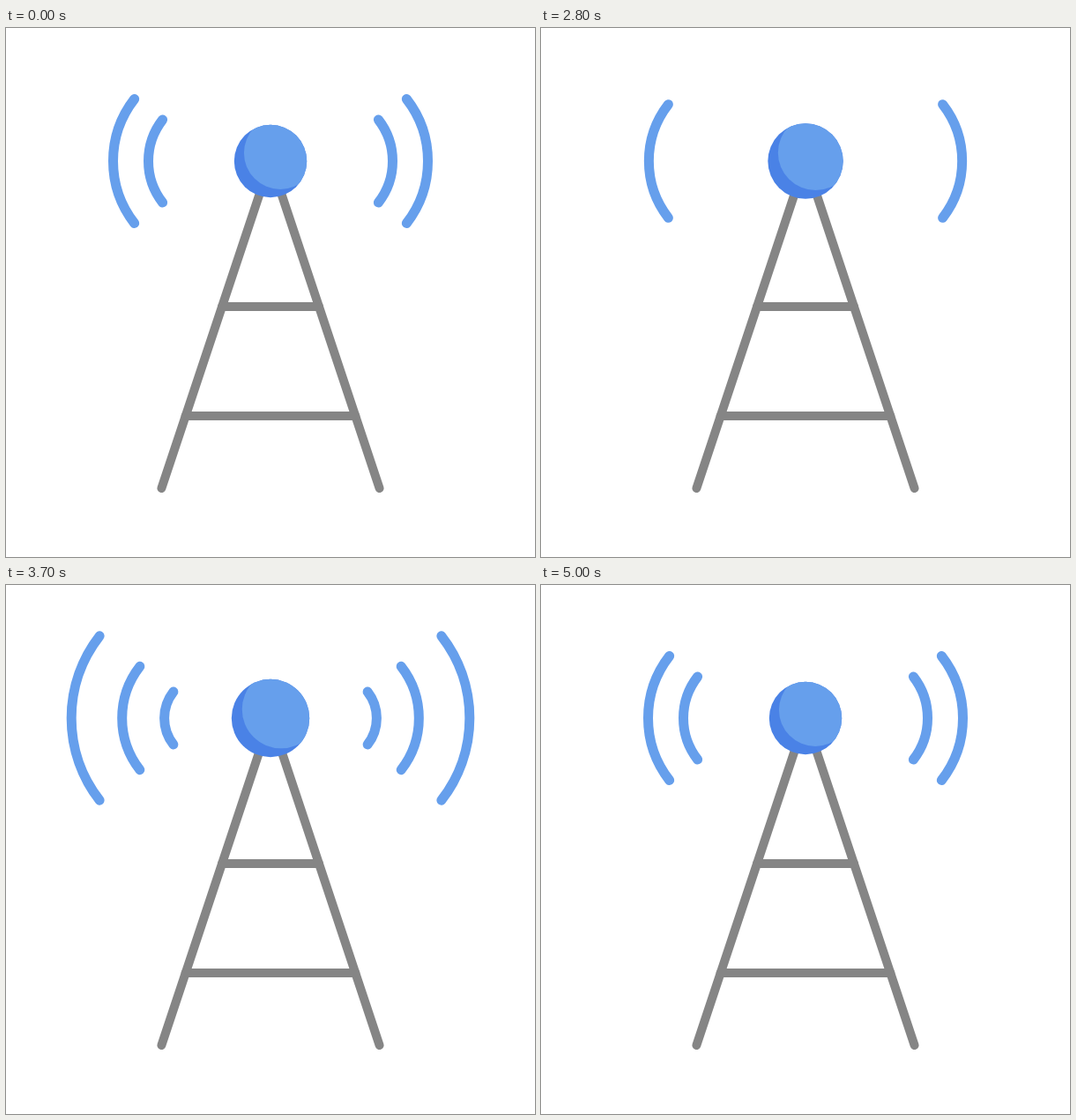
Recreate the animation shown at these times as an HTML page with a canvas. Size 600 by 600 pixels, loop 5020 ms.

```html
<!DOCTYPE html>
<html lang="en">
<head>
<meta charset="utf-8">
<title>Radio mast</title>
<style>
  html, body { margin: 0; width: 100%; height: 100%; overflow: hidden; background: #fff; }
  canvas { display: block; width: 600px; height: 600px; }
</style>
</head>
<body>
<canvas id="stage" width="600" height="600"></canvas>
<script>
const ctx = document.getElementById('stage').getContext('2d');
const LOOP = 5020, HOLD = 2020, START = 2000, SPAN = 3000;
const CX = 300, CY = 151;
const LIGHT = '#669fec', DARK = '#4a82e6', GRAY = '#858585';

// Wave poses: distance from the mast, half height
const SMALL = [116, 27.3], LARGE = [245.5, 105];
const INNER = [138.5, 47], OUTER = [178.5, 70.5];

const linear = p => p;
const easeIn = p => p * p;
const easeOut = p => 1 - (1 - p) * (1 - p);
const smooth = p => p * p * (3 - 2 * p);

const wave = (begin, end, from, to, ease) => ({ begin, end, from, to, ease });
const waves = [
  wave(0, 655, OUTER, LARGE, easeIn),
  wave(0, 770, INNER, LARGE, easeIn),
  ...[562, 808, 1025, 1276, 1498, 1683, 1843, 2105]
    .map(t => wave(t, t + 500, SMALL, LARGE, linear)),
  wave(2350, SPAN, SMALL, OUTER, easeOut),
  wave(2600, SPAN, SMALL, INNER, easeOut)
];

function line(x1, y1, x2, y2) {
  ctx.beginPath();
  ctx.moveTo(x1, y1);
  ctx.lineTo(x2, y2);
  ctx.stroke();
}

function disc(x, y, r, color) {
  ctx.fillStyle = color;
  ctx.beginPath();
  ctx.arc(x, y, r, 0, Math.PI * 2);
  ctx.fill();
}

function drawMast() {
  ctx.strokeStyle = GRAY;
  ctx.lineWidth = 10;
  for (const side of [-1, 1]) line(CX, CY, CX + side * 123.6, 522);
  for (const y of [316, 440]) {
    const half = (y - CY) / 3;
    line(CX - half, y, CX + half, y);
  }
}

function drawBall(r) {
  disc(CX, CY, r, DARK);
  ctx.save();
  ctx.beginPath();
  ctx.arc(CX, CY, r, 0, Math.PI * 2);
  ctx.clip();
  disc(CX + r * 0.27, CY - r * 0.225, r, LIGHT);
  ctx.restore();
}

function drawWave([d, h]) {
  const r = h * 1.629, a = Math.asin(h / r);
  ctx.strokeStyle = LIGHT;
  ctx.lineWidth = 11;
  for (const turn of [0, Math.PI]) {
    const x = CX + Math.cos(turn) * (d - r);
    ctx.beginPath();
    ctx.arc(x, CY, r, turn - a, turn + a);
    ctx.stroke();
  }
}

function ballRadius(t) {
  const p = (t % 1000) / 1000;
  const swell = p < 0.2 ? smooth(p / 0.2) : 1 - smooth((p - 0.2) / 0.8);
  return 41.2 + 9.5 * swell;
}

// Motion advances in alternating steps of 30 and 20 ms
function motionTime(t) {
  if (t < HOLD) return 0;
  const r = (t - HOLD) % 50;
  return t - (r < 30 ? r : r - 30) - START;
}

function draw(now) {
  const t = motionTime(now % LOOP);
  ctx.fillStyle = '#fff';
  ctx.fillRect(0, 0, 600, 600);
  ctx.lineCap = 'round';
  drawMast();
  drawBall(ballRadius(t));

  if (t >= SPAN) {
    drawWave(INNER);
    drawWave(OUTER);
    return;
  }
  for (const w of waves) {
    if (t < w.begin || t > w.end) continue;
    const p = w.ease((t - w.begin) / (w.end - w.begin));
    drawWave(w.from.map((v, i) => v + (w.to[i] - v) * p));
  }
}

const origin = performance.now();
function tick() {
  draw(performance.now() - origin);
  requestAnimationFrame(tick);
}
tick();
</script>
</body>
</html>
```
